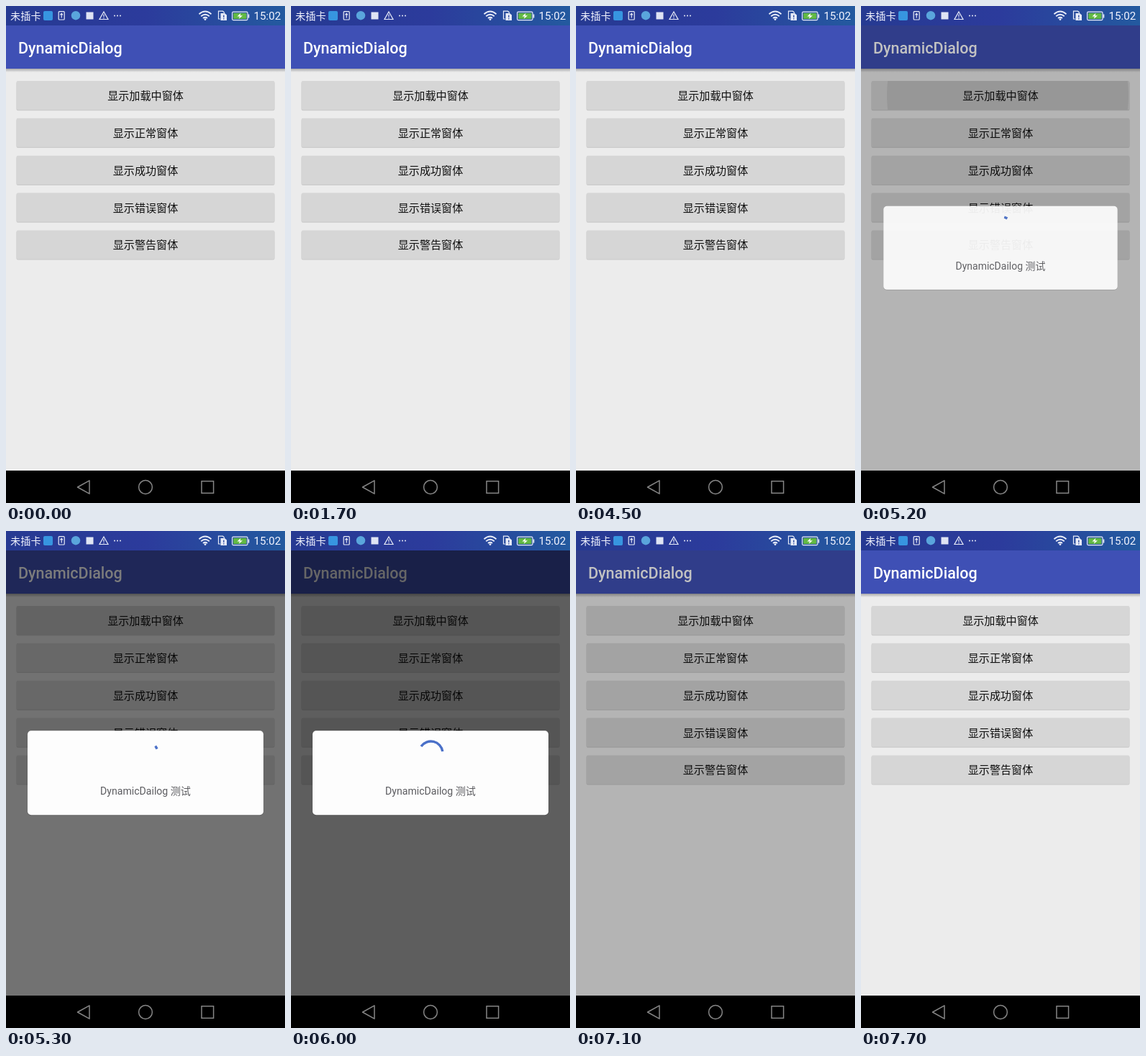
Animation, 388 px wide and 690 px high, one loop 8000 ms. Source, as an HTML page:

```html
<!DOCTYPE html>
<html lang="zh">
<head>
<meta charset="utf-8">
<title>DynamicDialog</title>
<style>
  html, body { margin: 0; width: 100%; height: 100%; overflow: hidden; background: #ececec; }
  svg { display: block; width: 388px; height: 690px; }
  text { font-family: Roboto, "Noto Sans CJK SC", "Noto Sans CJK", sans-serif; }
  .title { font-size: 21.5px; font-weight: 500; fill: #fff; }
  .label { font-size: 15.1px; font-weight: 500; fill: #111; text-anchor: middle; }
  .message { font-size: 14.1px; fill: #5c5c60; text-anchor: middle; }
  .line { fill: none; stroke: #e8ecf8; stroke-width: 1.2; }
  .nav { fill: none; stroke: #858585; stroke-width: 1.5; }
</style>
</head>
<body>
<svg viewBox="0 0 388 690">
  <defs>
    <linearGradient id="status">
      <stop offset="0" stop-color="#263a92"/>
      <stop offset=".5" stop-color="#2c3b9c"/>
      <stop offset="1" stop-color="#235a9f"/>
    </linearGradient>
    <linearGradient id="shade" x2="0" y2="1">
      <stop offset="0" stop-opacity=".28"/>
      <stop offset="1" stop-opacity="0"/>
    </linearGradient>
    <clipPath id="firstButton"><rect x="14.5" y="104" width="359" height="40" rx="2"/></clipPath>
  </defs>

  <rect width="388" height="690" fill="#ececec"/>
  <rect y="27" width="388" height="60" fill="#3f50b5"/>
  <rect y="87" width="388" height="5" fill="url(#shade)"/>
  <text class="title" x="17" y="66">DynamicDialog</text>

  <g id="buttons"></g>
  <g clip-path="url(#firstButton)"><circle id="ripple" cx="204" cy="124"/></g>
  <g id="labels"></g>

  <rect id="dim" y="27" width="388" height="618"/>

  <g id="dialog">
    <rect x="30" y="278.2" width="328" height="117" rx="5" fill="#000" opacity=".15"/>
    <rect x="30" y="277.3" width="328" height="117" rx="5" fill="#fdfdfd"/>
    <path id="wheel" fill="none" stroke="#4a70c8" stroke-width="3.4"/>
    <text class="message" x="194" y="366">DynamicDailog 测试</text>
  </g>

  <!-- status bar -->
  <rect width="388" height="27" fill="url(#status)"/>
  <text x="6" y="19" font-size="14.2" fill="#f2f4ff">未插卡</text>
  <rect x="52" y="7" width="13" height="13" rx="2" fill="#3795e0"/>
  <rect class="line" x="73.2" y="7.6" width="8" height="11.4" rx="1"/>
  <path class="line" d="M77.2 16.5V10.5M75.4 12.3L77.2 10.4L79 12.3"/>
  <circle cx="97" cy="13.2" r="6.2" fill="#5aa5dc"/>
  <rect x="111.5" y="8.5" width="10" height="10" fill="#dfe4f4"/>
  <path class="line" d="M136 8L142 18.5H130ZM136 11.5V15M136 16V17.3"/>
  <g fill="#e8ecf8">
    <circle cx="151" cy="13.5" r="1"/><circle cx="155" cy="13.5" r="1"/><circle cx="159" cy="13.5" r="1"/>
  </g>
  <g class="line" style="stroke-width:1.8">
    <path d="M268.5 11.2Q277 3.8 285.5 11.2M271.2 14.2Q277 9.2 282.8 14.2M274 17Q277 14.6 280 17"/>
  </g>
  <circle cx="277" cy="18.6" r="1.4" fill="#eef1fb"/>
  <path class="line" d="M298 18H295.5V7.2H301.5L304 9.5"/>
  <path d="M298.5 10H304L307 12.5V20H298.5Z" fill="#e8ecf8"/>
  <path d="M302.8 12.5V16M302.8 17V18.4" stroke="#2d4a9d" stroke-width="1.3"/>
  <rect class="line" x="314.6" y="8.2" width="21.4" height="11.4" rx="1.5"/>
  <rect x="336.6" y="11.5" width="1.7" height="5" fill="#e8ecf8"/>
  <rect x="316.2" y="9.8" width="18.2" height="8.2" fill="#62b944"/>
  <path d="M326.5 9.8L321.5 14.4H325L323.7 18L329 13.2H325.5Z" fill="#fff"/>
  <text x="344.5" y="19.3" font-size="15.2" fill="#f2f4ff">15:02</text>

  <!-- navigation bar -->
  <rect y="645" width="388" height="45"/>
  <path class="nav" d="M99.5 668L116 658.8V677.2Z" stroke-linejoin="round"/>
  <circle class="nav" cx="194" cy="668" r="9.4"/>
  <rect class="nav" x="272" y="659.7" width="16.6" height="16.6"/>
</svg>

<script>
const LOOP = 8000, STEP = 100;
const PRESS = 4800, OPEN = 5112, CLOSE = 6968, FADE = 220;
const SPIN = { start: 5153, speed: 0.36, pause: 300, cycle: 1130, min: 16, grow: 254 };
const el = id => document.getElementById(id);
const clamp = v => Math.min(1, Math.max(0, v));
const ease = (v, power) => 1 - (1 - clamp(v)) ** power;

['加载中', '正常', '成功', '错误', '警告'].forEach((kind, i) => {
  const y = 104 + i * 51.85;
  el('buttons').innerHTML +=
    `<rect x="14.5" y="${y + 1.2}" width="359" height="40" rx="2" opacity=".14"/>` +
    `<rect x="14.5" y="${y}" width="359" height="40" rx="2" fill="#d6d6d6"/>`;
  el('labels').innerHTML += `<text class="label" x="194" y="${y + 26}">显示${kind}窗体</text>`;
});

function wheelPath(t) {
  const period = SPIN.pause + SPIN.cycle;
  const phase = clamp((t % period - SPIN.pause) / SPIN.cycle);
  const travel = SPIN.grow * (1 - Math.cos(phase * Math.PI)) / 2;
  const shrinking = Math.floor(t / period) % 2 === 1;
  const from = SPIN.speed * t + (shrinking ? travel : 0);
  const length = SPIN.min + (shrinking ? SPIN.grow - travel : travel);
  const point = deg => {
    const a = deg * Math.PI / 180;
    return `${194.5 + 16.5 * Math.sin(a)} ${308.5 - 16.5 * Math.cos(a)}`;
  };
  return `M${point(from)}A16.5 16.5 0 ${length > 180 ? 1 : 0} 1 ${point(from + length)}`;
}

function draw(t) {
  const closing = t >= CLOSE;
  const into = (t - OPEN) / FADE, out = (t - CLOSE) / FADE;
  el('dim').setAttribute('opacity', 0.6 * (clamp(into) - clamp(out)));

  const alpha = ease((t - OPEN) / 150, 3) - ease((t - CLOSE) / 150, 3);
  const scale = closing ? 1 - 0.1 * ease(out, 5) : 0.9 + 0.1 * ease(into, 5);
  el('dialog').setAttribute('opacity', alpha);
  el('dialog').setAttribute('transform',
    `translate(194 335.8) scale(${scale}) translate(-194 -335.8)`);
  el('wheel').setAttribute('d', wheelPath(Math.max(0, t - SPIN.start)));

  el('ripple').setAttribute('r', Math.max(0, t - PRESS + 20) * 0.4);
  el('ripple').setAttribute('opacity', t < PRESS ? 0 : 0.09 * (1 - clamp((t - 5150) / 300)));
}

const begin = performance.now();
function tick() {
  const t = (performance.now() - begin) % LOOP;
  draw(Math.floor(t / STEP) * STEP);
  requestAnimationFrame(tick);
}
tick();
</script>
</body>
</html>
```
